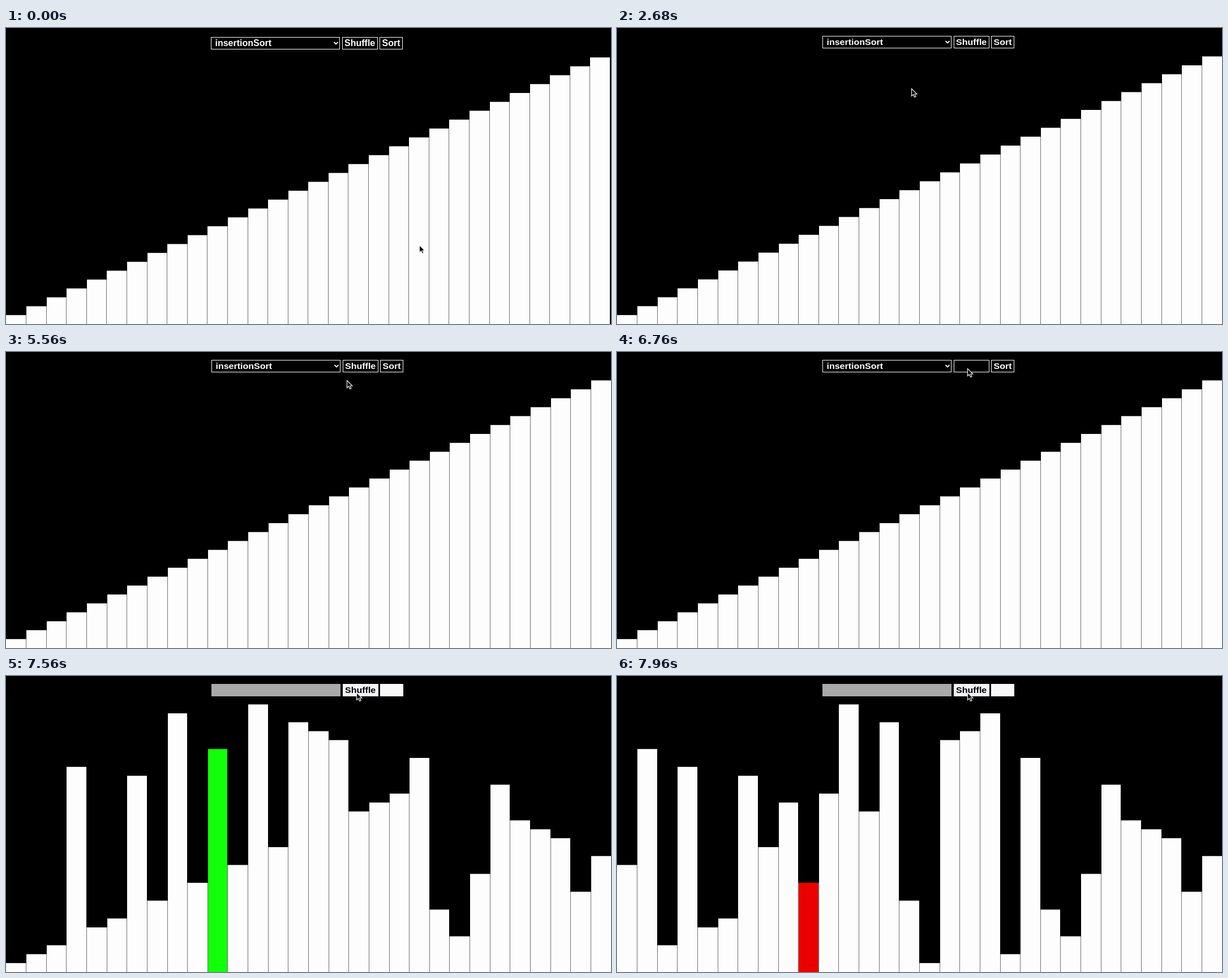
An HTML page with a canvas that plays this animation: 1069x524 px, repeating every 8000 ms.

```html
<!DOCTYPE html>
<html lang="en">
<head>
<meta charset="utf-8">
<title>Sorting bars</title>
<style>
  html, body { margin: 0; width: 100%; height: 100%; overflow: hidden; background: #000; }
  canvas { display: block; }
</style>
</head>
<body>
<canvas id="stage" width="1069" height="524"></canvas>
<script>
const ctx = document.getElementById('stage').getContext('2d');
const LOOP = 8000, TICK = 40, COUNT = 30;
const WHITE = '#fdfdfd';

// Page geometry: toolbar corner, bar width, bar base line, height per unit, vertical squash of glyphs
const layouts = [
  { from: 0, x: 362, y: 16, barW: 1067.5 / COUNT, base: 524, unit: 15.73, squash: 1 },
  { from: 80, x: 362, y: -3, barW: 1067.5 / COUNT, base: 542.4, unit: 16.93, squash: 1, scrollbar: true },
  { from: 2480, x: 363, y: 14, barW: 1069 / COUNT, base: 524, unit: 15.79, squash: 0.93 },
];

// Pointer path: time, x, y
const path = [
  [0, 730, 384], [80, 730, 384], [240, 520, 64], [2479, 520, 64], [2480, 520, 107],
  [3720, 520, 107], [4400, 562, 72], [4520, 566, 67], [5360, 598, 53],
  [5760, 606, 46], [6080, 606, 46], [6400, 619, 29], [LOOP, 619, 29],
];

// Shuffle: partner of each index, counting down from the last bar
const CLICK = 7160, SHUFFLE_START = 7190, SWAP_MS = 38;
const partners = [12, 8, 14, 15, 16, 20, 10, 3, 6, 10, 1, 8, 15, 16, 0, 7, 7, 0, 0, 1, 9];

function rect(x, y, w, h, color) {
  ctx.fillStyle = color;
  ctx.fillRect(x, y, w, h);
}

function pointerAt(t) {
  const k = Math.max(1, path.findIndex(p => p[0] > t));
  const [t0, x0, y0] = path[k - 1], [t1, x1, y1] = path[k];
  const f = (t - t0) / (t1 - t0);
  return { x: Math.round(x0 + (x1 - x0) * f), y: Math.round(y0 + (y1 - y0) * f) };
}

function barsAt(t) {
  const values = Array.from({ length: COUNT }, (_, i) => i + 1);
  const progress = (t - SHUFFLE_START) / SWAP_MS;
  if (progress < 0) return { values };
  const step = Math.min(Math.floor(progress), partners.length - 1);
  const swapped = progress - step >= 0.5;
  const done = step + (swapped ? 1 : 0);
  for (let k = 0; k < done; k++) {
    const i = COUNT - 1 - k, j = partners[k];
    [values[i], values[j]] = [values[j], values[i]];
  }
  return swapped
    ? { values, marked: partners[step], color: '#12ff0a' }
    : { values, marked: COUNT - 1 - step, color: '#eb0000' };
}

// Each bar keeps its first pixel column as a gap to its left neighbour
function drawBars({ values, marked, color }, { barW, base, unit }) {
  const top = i => base - values[i] * unit;
  values.forEach((_, i) => {
    const gap = Math.floor(i * barW), left = i ? gap + 1 : 0;
    const right = Math.floor((i + 1) * barW);
    rect(left, top(i), right - left, 560, i === marked ? color : WHITE);
    if (i) rect(gap, Math.max(top(i), top(i - 1)), 1, 560, '#707070');
  });
}

function drawBox(x, y, w, squash, label, textX, { fill = '#000', ink = '#fff', border = '#fff' } = {}) {
  rect(x, y, w, 22, border);
  rect(x + 1, y + 1, w - 2, 20, fill);
  ctx.save();
  ctx.translate(x + textX, y + 16);
  ctx.scale(1, squash);
  ctx.fillStyle = ink;
  ctx.fillText(label, 0, 0);
  ctx.restore();
}

function drawToolbar({ x, y, squash }, hover, busy) {
  ctx.font = 'bold 16px "Liberation Sans", Arial, sans-serif';
  const flat = color => ({ fill: color, ink: color, border: color });
  drawBox(x, y, 228, squash, busy ? '' : 'insertionSort', 7.5, busy ? flat('#a9a9a9') : {});
  if (!busy) {
    ctx.strokeStyle = '#fff';
    ctx.lineWidth = 1.8;
    ctx.beginPath();
    ctx.moveTo(x + 217.5, y + 9);
    ctx.lineTo(x + 221, y + 12.5);
    ctx.lineTo(x + 224.5, y + 9);
    ctx.stroke();
  }
  const shuffle = busy ? { fill: '#f3f3f8', ink: '#000', border: '#f3f3f8' }
    : hover ? { ink: '#000' } : {};
  drawBox(x + 232, y, 63, squash, 'Shuffle', 4, shuffle);
  drawBox(x + 298, y, 41, squash, busy ? '' : 'Sort', 4.5, busy ? flat('#f8f8f8') : {});
}

function triangle(x, y, dir, color) {
  ctx.fillStyle = color;
  ctx.beginPath();
  ctx.moveTo(x - 3, y);
  ctx.lineTo(x + 3, y);
  ctx.lineTo(x, y + 3 * dir);
  ctx.fill();
}

function drawScrollbar() {
  rect(1056, 0, 12, 524, '#f1f1f1');
  rect(1068, 0, 1, 524, '#000');
  rect(1057, 12, 9, 482, '#c1c1c1');
  triangle(1061.5, 8, -1, '#a3a3a3');
  triangle(1061.5, 516, 1, '#505050');
}

function drawPointer({ x, y }) {
  const outline = [[0, 0], [0, 13], [3, 10.3], [5.2, 15], [7.5, 14], [5.4, 9.5], [9.5, 9.5]];
  ctx.beginPath();
  outline.forEach(([dx, dy]) => ctx.lineTo(x + 0.5 + dx, y + 0.5 + dy));
  ctx.closePath();
  ctx.fillStyle = '#000';
  ctx.fill();
  ctx.strokeStyle = '#eee';
  ctx.lineWidth = 1.2;
  ctx.stroke();
}

function draw(t) {
  const layout = layouts.findLast(l => l.from <= t);
  const pointer = pointerAt(t);
  const hover = pointer.x >= layout.x + 232 && pointer.x < layout.x + 295
    && pointer.y >= layout.y && pointer.y < layout.y + 22;
  rect(0, 0, 1069, 524, '#000');
  drawBars(barsAt(t), layout);
  drawToolbar(layout, hover, t >= CLICK);
  if (layout.scrollbar) drawScrollbar();
  drawPointer(pointer);
}

const start = performance.now();
function frame() {
  const t = (performance.now() - start) % LOOP;
  draw(Math.floor(t / TICK) * TICK);
  requestAnimationFrame(frame);
}
frame();
</script>
</body>
</html>
```
